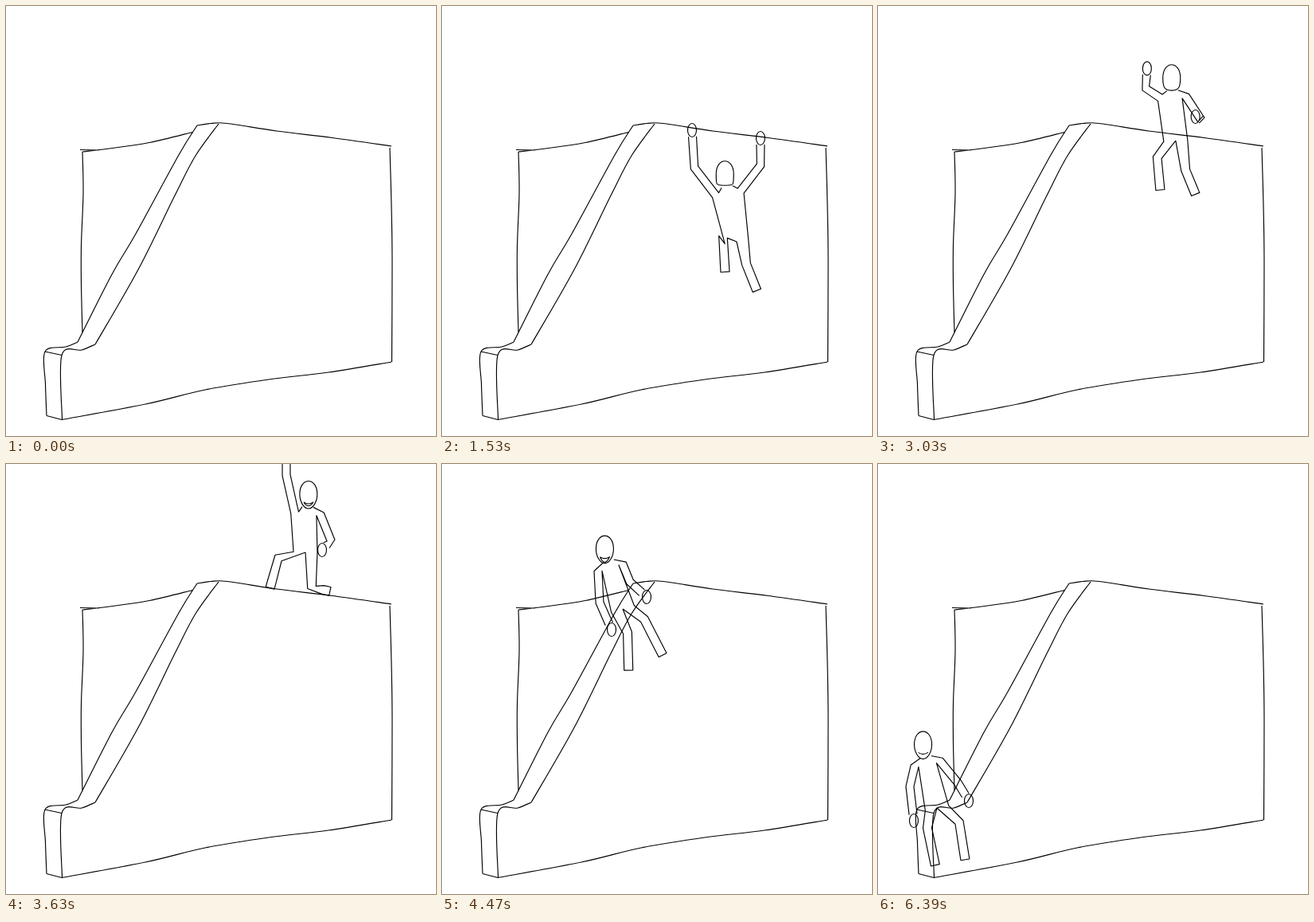
Recreate the animation shown at these times as an HTML page. Size 540x540 px, loop 7050 ms.

```html
<!DOCTYPE html>
<html lang="en">
<head>
<meta charset="utf-8">
<title>Over the wall</title>
<style>
html, body { margin: 0; width: 100%; height: 100%; overflow: hidden; background: #fff; }
svg { display: block; width: 100vw; height: 100vh; }
path { fill: none; stroke: #000; stroke-width: 1.15; stroke-linejoin: round; }
</style>
</head>
<body>
<svg viewBox="0 0 540 540"><path id="wall"/><path id="man"/></svg>
<script>
const add = (a, b, k = 1) => [a[0] + b[0] * k, a[1] + b[1] * k];
const unit = (a, b) => {
  const x = b[0] - a[0], y = b[1] - a[1], d = Math.hypot(x, y) || 1;
  return [x / d, y / d];
};
const right = ([x, y]) => [-y, x];
const mix = (a, b, k) => Array.isArray(a) ? a.map((v, i) => mix(v, b[i], k)) : a + (b - a) * k;
const line = pts => "M" + pts.join("L");

// Smooth stroke through a few points
function stroke(pts) {
  let d = "M" + pts[0];
  for (let i = 1; i < pts.length; i++) {
    const a = pts[i - 1], b = pts[i];
    const before = pts[i - 2] || a, after = pts[i + 1] || b;
    const c1 = add(a, add(b, before, -1), 1 / 6), c2 = add(b, add(after, a, -1), -1 / 6);
    d += `C${c1} ${c2} ${b}`;
  }
  return d;
}

const wall = [
  [[93, 180.5], [117, 181]],
  [[96, 183], [130, 179], [180, 171.5], [234, 158.5]],
  [[96, 183], [97, 235], [94.5, 300], [94.5, 350], [96, 411]],
  [[240, 150], [217, 187], [163, 286], [133, 337], [90, 422]],
  [[267, 148], [238, 188], [212, 238], [166, 331], [112, 425]],
  [[240, 150], [257, 147.5], [278, 147.5], [340, 157], [410, 165.5], [484, 176]],
  [[482, 178], [484, 250], [485, 320], [484.5, 447]],
  [[70, 519.5], [175, 500], [250, 482], [330, 469], [405, 460], [484, 447]],
  [[90, 422], [75, 428], [49, 434], [49.5, 475], [51, 514.5]],
  [[112, 425], [95, 432], [70, 438.5], [70.5, 519.5]]
];
document.getElementById("wall").setAttribute("d", wall.map(stroke).join("") +
  "M49 434L70 438.5M51 514.5L70 519.5");

// neck, hip, arms [elbow, hand], legs [knee, ankle], look [facing us, grin]
const run = [[520, 352], [526, 408], [[[512, 385], [499, 372]], [[546, 372], [556, 390]]],
  [[[508, 432], [502, 458]], [[540, 432], [560, 448]]], [0, 0]];
const grab = [[358, 227], [370, 296], [[[317, 203], [314, 156]], [[400, 200], [400, 166]]],
  [[[353, 290], [355, 325]], [[382, 324], [392, 349]]], [0, 0]];
const dangle = [[362, 227], [372, 295], [[[323, 204], [326, 156]], [[404, 208], [400, 165]]],
  [[[358, 328], [370, 362]], [[388, 326], [393, 364]]], [0, 0]];
const cheer = [[379, 54], [376, 111], [[[352, 14], [352, -14]], [[408, 96], [397, 108]]],
  [[[342, 118], [334, 147]], [[384, 155], [398, 158]]], [1, 4]];
const sit = [[209, 122], [227, 182], [[[198, 174], [213, 208]], [[236, 148], [257, 167]]],
  [[[233, 212], [234, 250]], [[254, 195], [273, 232]]], [1, 7]];
const land = [[42, 374], [68, 432], [[[14, 405], [25, 429]], [[92, 396], [114, 423]]],
  [[[55, 466], [74, 490]], [[107, 443], [121, 479]]], [1, 5]];
const rest = [[60, 368], [74, 432], [[[40, 405], [45, 448]], [[100, 400], [114, 423]]],
  [[[62, 457], [70, 495]], [[102, 450], [108, 488]]], [1, 0]];
const pant = [...rest.slice(0, 4), [1, 4]];

const warp = ([neck, hip, arms, legs, look], body, elbow = body, hand = body) =>
  [body(neck), body(hip), arms.map(([e, h]) => [elbow(e), hand(h)]), legs.map(l => l.map(body)), look];
const shift = (p, dx) => warp(p, q => add(q, [dx, 0]));

// Swing the body below the hands, lower or higher by `drop`
function sway(p, angle, drop) {
  const [x, y] = mix(p[2][0][1], p[2][1][1], .5), c = Math.cos(angle), s = Math.sin(angle);
  const turn = fall => q => {
    const [u, v] = [q[0] - x, q[1] - y];
    return [x + u * c - v * s, y + u * s + v * c + fall];
  };
  return warp(p, turn(drop), turn(drop / 3), q => q);
}

// One side of a limb: its joints moved sideways by w
const edge = (pts, w) => pts.map((p, i) =>
  add(p, right(unit(pts[Math.max(0, i - 1)], pts[Math.min(pts.length - 1, i + 1)])), w));

const oval = ([x, y], rx, ry) => `M${x - rx} ${y}a${rx} ${ry} 0 1 0 ${2 * rx} 0a${rx} ${ry} 0 1 0 ${-2 * rx} 0Z`;

function face([x, y], [front, grin]) {
  const at = (u, v) => `${x + u} ${y + v} `;
  const chin = 14 + 4 * front, jaw = 15 - 6 * front, base = 11 - 5 * front;
  const skull = "M" + at(-11, 0) + "C" + at(-11, -22) + at(11, -22) + at(11, 0) +
    "C" + at(11, jaw) + at(base, chin) + at(0, chin) + "C" + at(-base, chin) + at(-11, jaw) + at(-11, 0);
  if (front < .5) return skull;
  return skull + "M" + at(-6, 10) + "Q" + at(0, 14) + at(6, 10) + "Q" + at(0, 14 + grin * 1.3) + at(-6, 10);
}

function figure([neck, hip, arms, legs, look]) {
  const spine = unit(neck, hip), across = right(spine).map(v => -v);
  const halves = [-1, 1].map((s, i) => {
    const [elbow, hand] = arms[i], [knee, ankle] = legs[i];
    const shoulder = add(add(neck, spine, 8), across, s * 16);
    const arm = [add(hand, unit(hand, elbow), 8), elbow, shoulder];
    const leg = [add(ankle, unit(knee, ankle), 9), ankle, knee, add(hip, across, s * 8)];
    const outer = edge(leg, s * 5.5).slice(0, 3), inner = edge(leg, -s * 5.5).slice(0, 3);
    return oval(hand, 5.5, 8.5) +
      line([...edge(arm, s * 5), add(neck, across, s * 7)]) +
      line([...edge(arm, -s * 5), add(hip, across, s * 15), ...outer.reverse(), ...inner, hip]);
  });
  return halves.join("") + face(add(neck, spine, -16), look);
}

// Each phase runs from its start to the next one, x going from 0 to 1
const phases = [
  [0, () => null],
  [510, x => shift(run, 27 - 108 * x)],
  [870, x => shift(grab, 70 * (1 - x) ** 4)],
  [1530, x => sway(mix(grab, dangle, x), .35 * Math.sin(Math.PI * x), 38 * Math.sin(Math.PI * x))],
  [2430, x => sway(dangle, 0, -77 * x)],
  [2670, x => mix(sway(dangle, 0, -77), cheer, x ** .8)],
  [3630, x => mix(cheer, sit, x * x * (3 - 2 * x))],
  [4470, x => mix(sit, land, x * x)],
  [5160, x => mix(land, pant, x ** 3)],
  [5760, x => mix(pant, rest, x)],
  [6390, () => rest],
  [7050]
];

// Moments at which a new drawing appears
const beats = [0, 510, 570, 750, 870, 1050, 1170, 1530, 1830, 2070, 2310, 2430, 2550, 2670,
  2850, 3030, 3210, 3390, 3510, 3630, 3870, 3990, 4110, 4230, 4350, 4470,
  4710, 4890, 5040, 5160, 5340, 5760, 6390];

function poseAt(t) {
  const i = phases.findIndex(p => p[0] > t) - 1;
  const [from, pose] = phases[i];
  return pose((t - from) / (phases[i + 1][0] - from));
}

const man = document.getElementById("man");
const start = performance.now();
let shown = -1;

function tick() {
  const t = (performance.now() - start) % 7050;
  const beat = beats.filter(b => b <= t).pop();
  if (beat !== shown) {
    const pose = poseAt(beat);
    man.setAttribute("d", pose ? figure(pose) : "");
    shown = beat;
  }
  requestAnimationFrame(tick);
}
tick();
</script>
</body>
</html>
```
